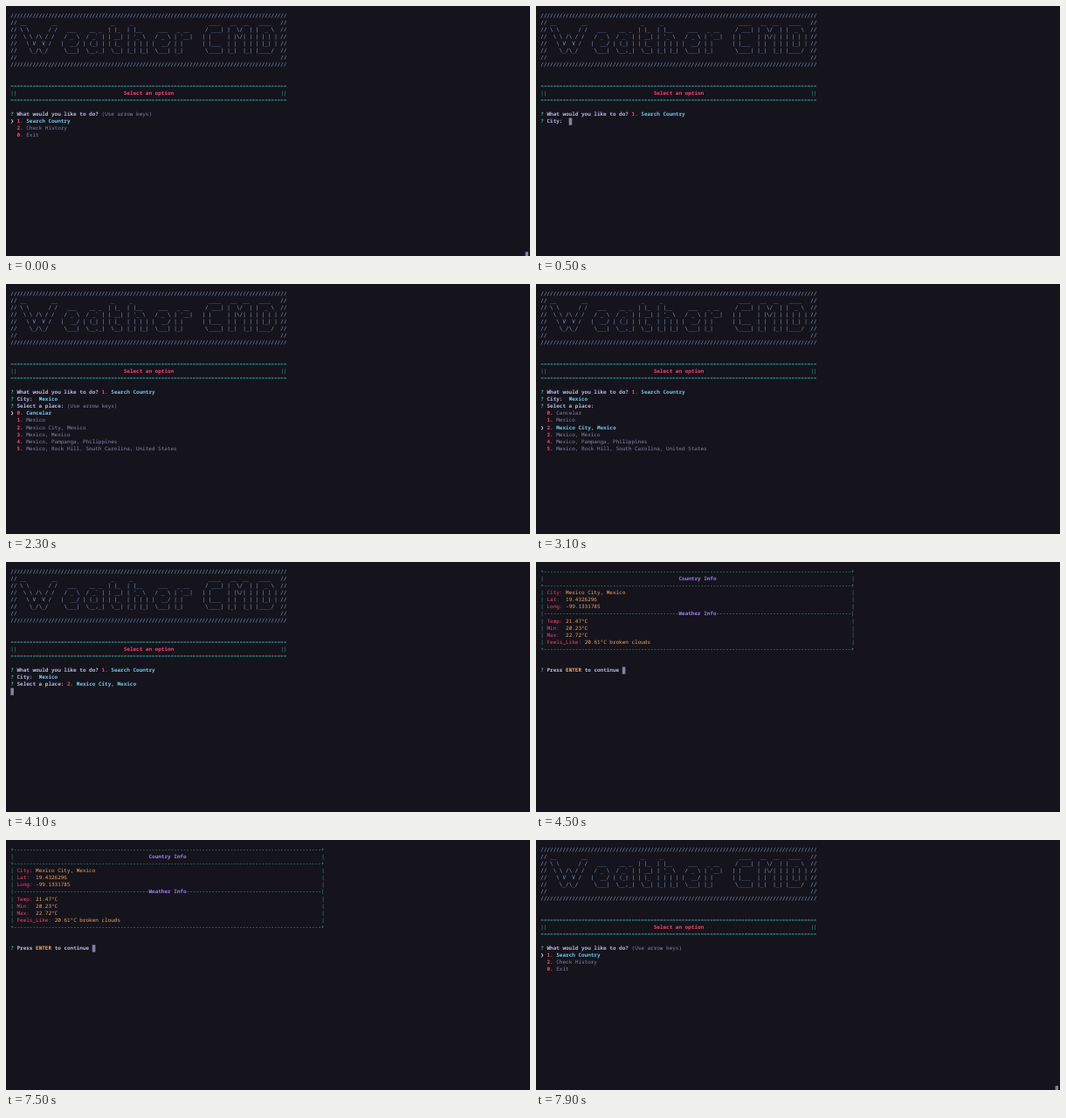
Animation, 600 px wide and 287 px high, one loop 8 s. Source, as an HTML page:

```html
<!DOCTYPE html>
<html lang="en">
<head>
<meta charset="utf-8">
<title>Terminal weather</title>
<style>
  html, body { margin: 0; width: 100%; height: 100%; overflow: hidden; background: #15131c; }
  svg { display: block; width: 600px; height: 287px; }
  text {
    font: 5.99px "Noto Sans Mono", "DejaVu Sans Mono", monospace;
    white-space: pre;
    text-rendering: geometricPrecision;
  }
  .b { font-weight: 700; }
  .art { fill: #86a2c8; font: 5.97px "DejaVu Sans Mono", monospace; transform: translateY(-0.4px); }
  .teal { fill: #38b0a6; }
  .red { fill: #f5456f; }
  .cyan { fill: #6cc8ec; }
  .lav { fill: #b6bae4; }
  .dim { fill: #8586a8; }
  .typed { fill: #9596ba; }
  .white { fill: #eceaf4; }
  .orange { fill: #f3a65f; }
  .purple { fill: #9d7df5; }
  .cursor { fill: #83829f; }
</style>
</head>
<body>
<svg id="screen" viewBox="0 0 600 287"></svg>
<script type="text/plain" id="logo">
 __        __                 _     _                      ____   __  __   ____
 \ \      / /   ___    __ _  | |_  | |__     ___   _ __     / ___| |  \/  | |  _ \
  \ \ /\ / /   / _ \  / _` | | __| | '_ \   / _ \ | '__|   | |     | |\/| | | | | |
   \ V  V /   |  __/ | (_| | | |_  | | | | |  __/ | |      | |___  | |  | | | |_| |
    \_/\_/     \___|  \__,_|  \__| |_| |_|  \___| |_|       \____| |_|  |_| |____/
</script>
<script>
const LOOP = 8000, X0 = 5.3, Y0 = 13, CELL_W = 3.595, CELL_H = 8.08;
const screen = document.getElementById("screen");

const put = (row, col, str, cls) =>
  `<text x="${(X0 + col * CELL_W).toFixed(2)}" y="${(Y0 + row * CELL_H).toFixed(2)}" class="${cls}">${str}</text>`;

const cursor = (row, col) =>
  `<rect x="${X0 + col * CELL_W}" y="${7.3 + row * CELL_H}" width="3.6" height="8.2" class="cursor"/>`;

const ask = (row, label) => put(row, 0, "?", "teal b") + put(row, 2, label, "lav b");
const hint = (row, col) => put(row, col, "(Use arrow keys)", "dim");

function banner() {
  const lines = document.getElementById("logo").textContent.split("\n").slice(1, 6);
  // The first line holds only underscores, placed by column
  const top = [[1, 2], [11, 2], [30, 1], [36, 1], [61, 4], [68, 2], [72, 2], [77, 4]];
  lines[0] = top.reduce((s, [col, n]) => s.padEnd(col) + "_".repeat(n), "");
  const edge = "/".repeat(88);
  const rows = [edge, ...[...lines, ""].map(s => "//" + s.padEnd(84) + "//"), edge];
  const rule = "=".repeat(88);
  return rows.map((s, i) => put(i, 0, s, "art")).join("") +
    put(10, 0, rule, "teal") + put(12, 0, rule, "teal") +
    put(11, 0, "||", "teal") + put(11, 86, "||", "teal") +
    put(11, 36, "Select an option", "red b");
}

function list(row, items, active) {
  return items.map(([num, label], i) =>
    (i === active ? put(row + i, 0, "❯", "white b") : "") +
    put(row + i, 2, num + ".", "red b") +
    put(row + i, 5, label, i === active ? "cyan b" : "dim")).join("");
}

const head = banner();
const question = ask(14, "What would you like to do?");
const chosen = head + question + put(14, 29, "1.", "red b") + put(14, 32, "Search Country", "cyan b");
const cityAsk = chosen + ask(15, "City:");
const cityDone = cityAsk + put(15, 9, "Mexico", "cyan b");
const placeAsk = cityDone + ask(16, "Select a place:");

const places = ["Cancelar", "Mexico", "Mexico City, Mexico", "Mexico, Mexico",
  "Mexico, Pampanga, Philippines", "Mexico, Rock Hill, South Carolina, United States"]
  .map((name, i) => [i, name]);

const menu = head + question + hint(14, 29) +
  list(15, [[1, "Search Country"], [2, "Check History"], [0, "Exit"]], 0) +
  `<rect x="594.6" y="282.2" width="3.4" height="4.8" class="cursor"/>`;

const typing = n => cityAsk + put(15, 9, "Mexico".slice(0, n), "typed") + cursor(15, 9 + n);
const picking = i => placeAsk + (i ? "" : hint(16, 18)) + list(17, places, i);
const picked = placeAsk + put(16, 18, "2.", "red b") +
  put(16, 21, places[2][1], "cyan b") + cursor(17, 0);

function report() {
  const rule = "+" + "-".repeat(98) + "+";
  const data = [
    [3, "City:", "Mexico City, Mexico"], [4, "Lat:", "19.4326296"], [5, "Long:", "-99.1331785"],
    [7, "Temp:", "21.47°C"], [8, "Min:", "20.23°C"], [9, "Max:", "22.72°C"],
    [10, "Feels_Like:", "20.61°C broken clouds"]
  ];
  const sides = [1, ...data.map(d => d[0])];
  return [0, 2, 11].map(r => put(r, 0, rule, "teal")).join("") +
    sides.map(r => put(r, 0, "|", "teal") + put(r, 99, "|", "teal")).join("") +
    put(1, 44, "Country Info", "purple b") +
    put(6, 0, "|" + "-".repeat(43), "teal") + put(6, 44, "Weather Info", "purple b") +
    put(6, 56, "-".repeat(43) + "|", "teal") +
    data.map(([r, key, val]) =>
      put(r, 2, key, "red") + put(r, key.length > 5 ? 14 : 8, val, "orange")).join("") +
    ask(14, "Press") + put(14, 8, "ENTER", "orange b") +
    put(14, 14, "to continue", "lav b") + cursor(14, 26);
}

const steps = [
  [0, menu], [500, typing(0)],
  ...[2, 3, 4, 5, 6].map((n, i) => [1100 + i * 200, typing(n)]),
  [2100, cityDone + cursor(16, 0)],
  [2300, picking(0)], [2900, picking(1)], [3100, picking(2)],
  [4100, picked], [4500, report()], [7900, menu]
];

let shown = null;
function render(t) {
  const view = steps.filter(s => s[0] <= t).pop()[1];
  if (view !== shown) screen.innerHTML = shown = view;
}

const start = performance.now();
function tick() {
  render((performance.now() - start) % LOOP);
  requestAnimationFrame(tick);
}
tick();
</script>
</body>
</html>
```
